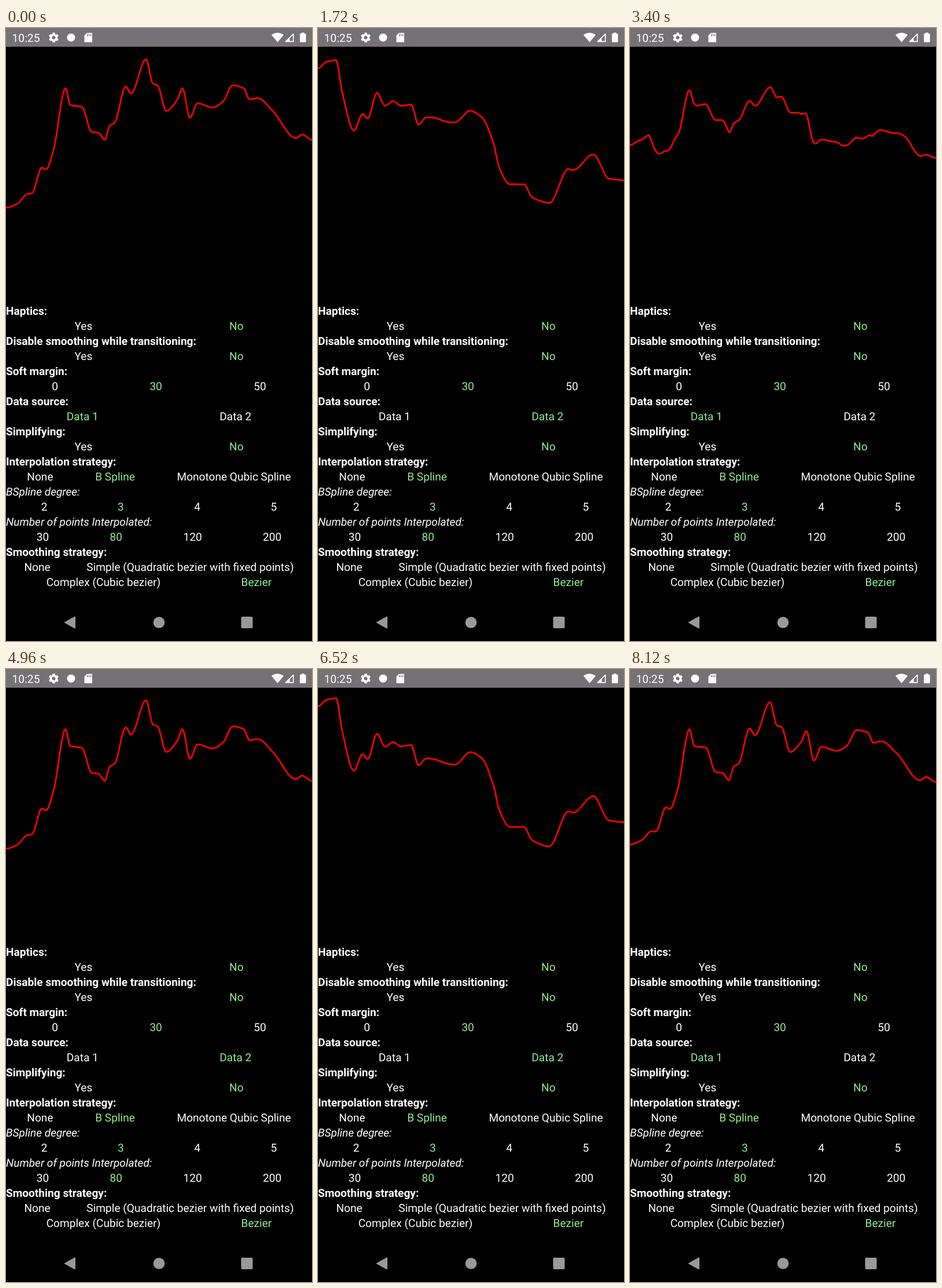
These frames come from a looping animation (529 by 1058 pixels, 8400 ms). An HTML page with a canvas:

```html
<!DOCTYPE html>
<html lang="en">
<head>
<meta charset="utf-8">
<title>Chart options</title>
<style>
  html, body { margin: 0; width: 529px; height: 1058px; overflow: hidden; background: #000; }
  body {
    position: relative; color: #fff; font: 19.1px Roboto, sans-serif;
    text-rendering: geometricPrecision;
  }
  canvas { position: absolute; left: 0; top: 0; display: block; }
  #clock { position: absolute; left: 10.5px; top: 0; font-size: 19.3px; line-height: 35px; }
  #panel { position: absolute; left: 0; top: 476.4px; width: 529px; }
  #panel div { height: 25.96px; line-height: 25.96px; white-space: nowrap; }
  .row { display: flex; justify-content: space-around; }
  .head { font-weight: 700; }
  .sub { font-style: italic; }
  .on { color: #90ee90; }
</style>
</head>
<body>
<canvas id="stage" width="529" height="1058"></canvas>
<div id="clock">10:25</div>
<div id="panel">
  <div class="head">Haptics:</div>
  <div class="row"><span>Yes</span><span class="on">No</span></div>
  <div class="head">Disable smoothing while transitioning:</div>
  <div class="row"><span>Yes</span><span class="on">No</span></div>
  <div class="head">Soft margin:</div>
  <div class="row"><span>0</span><span class="on">30</span><span>50</span></div>
  <div class="head">Data source:</div>
  <div class="row"><span id="data1">Data 1</span><span id="data2">Data 2</span></div>
  <div class="head">Simplifying:</div>
  <div class="row"><span>Yes</span><span class="on">No</span></div>
  <div class="head">Interpolation strategy:</div>
  <div class="row"><span>None</span><span class="on">B Spline</span><span>Monotone Qubic Spline</span></div>
  <div class="sub">BSpline degree:</div>
  <div class="row"><span>2</span><span class="on">3</span><span>4</span><span>5</span></div>
  <div class="sub">Number of points Interpolated:</div>
  <div class="row"><span>30</span><span class="on">80</span><span>120</span><span>200</span></div>
  <div class="head">Smoothing strategy:</div>
  <div class="row"><span>None</span><span>Simple (Quadratic bezier with fixed points)</span></div>
  <div class="row"><span>Complex (Cubic bezier)</span><span class="on">Bezier</span></div>
</div>
<script>
const LOOP = 8400, STEP = 40, W = 529, H = 1058, BAR = '#757275';
const ctx = document.getElementById('stage').getContext('2d');
const tabs = ['data1', 'data2'].map(id => document.getElementById(id));

// Turning points (x, y); the spline below rounds the way between them.
const keys1 = [
  0,310, 20,303, 36,287, 45,285, 62,241, 69,244, 82,211, 103,104, 111,133, 131,136,
  148,179, 160,181, 171,193, 179,169, 188,163, 207,101, 216,113, 242,54, 254,96, 262,99,
  277,143, 296,124, 305,104, 318,155, 331,130, 357,137, 375,127, 392,99, 411,104, 421,123,
  435,121, 461,143, 501,190, 512,184, 529,193
];
const keys2 = [
  0,62, 14,51, 31,48, 42,106, 62,175, 77,146, 86,155, 102,112, 116,134, 130,126,
  143,133, 161,131, 174,166, 187,154, 237,166, 263,144, 283,154, 304,204, 313,243, 332,274,
  356,274, 370,297, 400,308, 433,247, 441,249, 476,220, 503,262, 529,265
];

// Monotone cubic through the points, sampled at every pixel column.
function sample(keys) {
  const n = keys.length / 2;
  const x = i => keys[2 * i], y = i => keys[2 * i + 1];
  const slope = i => (y(i + 1) - y(i)) / (x(i + 1) - x(i));
  const tangent = i => {
    if (i === 0 || i === n - 1) return 0;
    const a = slope(i - 1), b = slope(i);
    return a * b <= 0 ? 0 : 2 * a * b / (a + b);
  };
  const out = [];
  for (let px = 0, i = 0; px <= W; px++) {
    while (i < n - 2 && px > x(i + 1)) i++;
    const h = x(i + 1) - x(i), u = (px - x(i)) / h, v = 1 - u;
    out.push(y(i) * (1 + 2 * u) * v * v + tangent(i) * h * u * v * v
      + y(i + 1) * u * u * (3 - 2 * u) - tangent(i + 1) * h * u * u * v);
  }
  return out;
}
const curves = [keys1, keys2].map(sample);

// tap: the option lights up; move: the curve starts; rest: how far it gets
const switches = [
  { tap: 880, move: 1410, rest: .97 },
  { tap: 2760, move: 3240, rest: .97 },
  { tap: 4880, move: 5719, rest: .99 },
  { tap: 6800, move: 7300, rest: .97 }
];

const ease = (t, from, length) => {
  const u = Math.min(1, Math.max(0, (t - from) / length));
  return u < .5 ? 2 * u * u : 1 - 2 * (1 - u) * (1 - u);
};

function shape(...points) {
  ctx.beginPath();
  points.forEach(([x, y]) => ctx.lineTo(x, y));
  ctx.closePath();
}

function disc(x, y, r) {
  ctx.beginPath();
  ctx.arc(x, y, r, 0, 7);
  ctx.fill();
}

function box(x, y, w, h, r) {
  ctx.beginPath();
  ctx.roundRect(x, y, w, h, r);
  ctx.fill();
}

function gear(x, y) {
  ctx.save();
  ctx.translate(x, y);
  for (let i = 0; i < 6; i++) {
    ctx.rotate(Math.PI / 3);
    shape([-2.8, -5], [-1.8, -8.6], [1.8, -8.6], [2.8, -5]);
    ctx.fill();
  }
  disc(0, 0, 6.6);
  ctx.fillStyle = BAR;
  disc(0, 0, 3);
  ctx.restore();
}

function statusBar() {
  ctx.fillStyle = BAR;
  ctx.fillRect(0, 0, W, 32.4);
  ctx.fillStyle = ctx.strokeStyle = '#fff';

  gear(82.5, 16.5);
  disc(112.5, 16.5, 7);

  // memory card
  shape([140, 8.5], [149, 8.5], [149, 24.5], [135.5, 24.5], [135.5, 13]);
  ctx.fill();
  ctx.fillStyle = BAR;
  for (let i = 0; i < 3; i++) ctx.fillRect(140 + 3 * i, 10.5, 1.4, 3.6);
  ctx.fillStyle = '#fff';

  // wireless
  ctx.beginPath();
  ctx.moveTo(469.5, 24.5);
  ctx.lineTo(459, 12);
  ctx.quadraticCurveTo(469.5, 4.5, 480, 12);
  ctx.fill();

  // signal
  ctx.lineWidth = 1.7;
  shape([483.5, 23.3], [496.7, 23.3], [496.7, 10.3]);
  ctx.stroke();
  shape([482.5, 24], [490.5, 24], [490.5, 16]);
  ctx.fill();

  // battery
  box(511, 8, 4.5, 3, 0);
  box(508, 9.5, 10.5, 15, 1);
}

function navBar() {
  ctx.fillStyle = ctx.strokeStyle = '#999';
  ctx.lineWidth = 2;
  ctx.lineJoin = 'round';
  shape([102, 1026], [119, 1016.5], [119, 1035.5]);
  ctx.fill();
  ctx.stroke();
  disc(264.5, 1026, 9.8);
  box(406.5, 1016, 20, 20, 2);
}

function draw(t) {
  const count = switches.filter(s => t >= s.tap).length;
  const to = count % 2;
  let p = 1, fade = 1;
  if (count) {
    const { move, rest } = switches[count - 1];
    p = Math.min(rest, ease(t, move, 300));
    fade = 1 - .8 * (ease(t, move - 210, 150) - ease(t, move - 60, 250));
  }

  tabs.forEach((tab, i) => {
    tab.className = i === to ? 'on' : '';
    tab.style.opacity = i === to ? fade : 1;
  });

  ctx.fillStyle = '#000';
  ctx.fillRect(0, 0, W, H);
  statusBar();
  navBar();

  ctx.strokeStyle = '#fa0000';
  ctx.lineWidth = 2.8;
  ctx.beginPath();
  curves[to].forEach((y, x) => ctx.lineTo(x, y * p + curves[1 - to][x] * (1 - p)));
  ctx.stroke();
}

const start = performance.now();
function tick() {
  const t = (performance.now() - start) % LOOP;
  draw(Math.floor(t / STEP) * STEP);
  requestAnimationFrame(tick);
}
tick();
</script>
</body>
</html>
```
